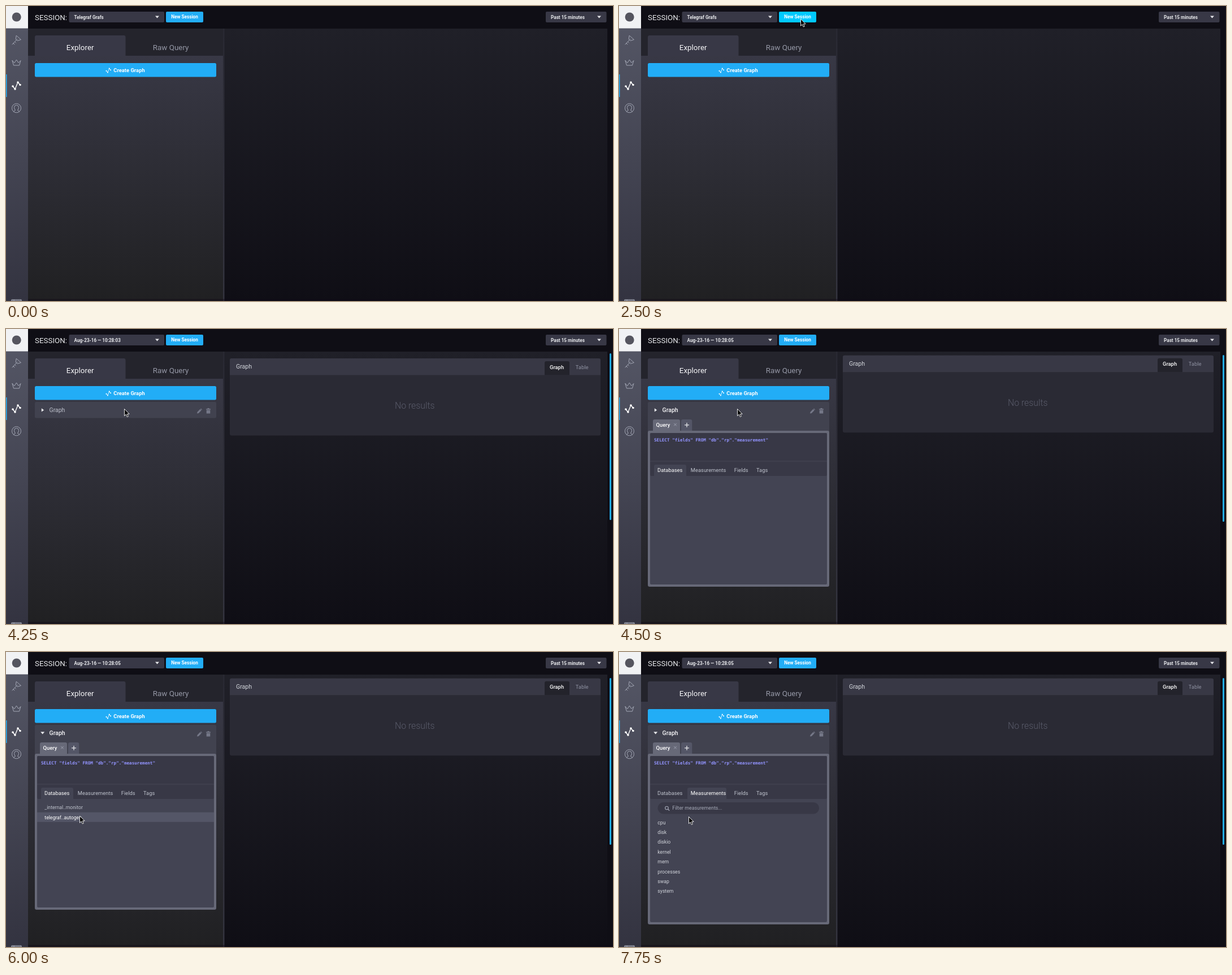
An HTML page for the animation above (8000 ms loop, 1074 by 522 pixels).

```html
<!DOCTYPE html>
<html lang="en">
<head>
<meta charset="utf-8">
<title>Query explorer</title>
<style>
  html, body { margin: 0; width: 100%; height: 100%; overflow: hidden; background: #0f0e15; }
  svg { display: block; width: 100%; height: 100%; }
  text { font-family: Roboto, sans-serif; white-space: pre; }
  .mono { font-family: "DejaVu Sans Mono", monospace; }
</style>
</head>
<body>
<svg id="stage" viewBox="0 0 1074 522">
  <defs>
    <linearGradient id="page" x2="0" y2="1"><stop stop-color="#202028"/><stop offset="1" stop-color="#0f0e15"/></linearGradient>
    <linearGradient id="side" x2="0" y2="1"><stop stop-color="#565867"/><stop offset="1" stop-color="#333340"/></linearGradient>
    <linearGradient id="left" x2="0" y2="1"><stop stop-color="#383845"/><stop offset="1" stop-color="#202022"/></linearGradient>
    <linearGradient id="edge" x2="0" y2="1"><stop stop-color="#292933"/><stop offset="1" stop-color="#34343f"/></linearGradient>
  </defs>
</svg>
<script>
const LOOP = 8000;
const stage = document.getElementById('stage');

const rect = (x, y, w, h, fill, r = 0, more = '') =>
  `<rect x="${x}" y="${y}" width="${w}" height="${h}" rx="${r}" fill="${fill}" ${more}/>`;
const text = (x, y, size, fill, str, weight = 400, more = '') =>
  `<text x="${x}" y="${y}" font-size="${size}" fill="${fill}" font-weight="${weight}" ${more}>${str}</text>`;
const fillPath = (d, fill) => `<path d="${d}" fill="${fill}"/>`;
const line = (d, color, width = 1) =>
  `<path d="${d}" fill="none" stroke="${color}" stroke-width="${width}" stroke-linejoin="round" stroke-linecap="round"/>`;
const group = (id, body) => `<g id="${id}">${body}</g>`;
const caret = (x, y) => fillPath(`M${x} ${y}h7l-3.5 4z`, '#e7e8eb');
const topTab = (x, y, w, h, fill) =>
  fillPath(`M${x} ${y + h}v${3 - h}q0 -3 3 -3h${w - 6}q3 0 3 3v${h - 3}z`, fill);

function graphIcon(x, y, scale) {
  const points = [[-6.5, 1.5], [-2.5, 6.5], [2.5, -5.5], [6.5, -1]];
  const dots = points.map(([a, b]) => `<circle cx="${a}" cy="${b}" r="1.8" fill="#fff"/>`).join('');
  return `<g transform="translate(${x} ${y}) scale(${scale})">${line('M' + points.join('L'), '#fff', 1.4)}${dots}</g>`;
}

function sidebar() {
  const grey = '#a4a8b6';
  return rect(0, 0, 39, 522, 'url(#side)') +
    rect(0, 0, 39, 39.5, '#f1f2f4') +
    '<circle cx="18.7" cy="19.5" r="8" fill="#55555f"/>' +
    line('M11 68L20 58.5M13 66l2 2M15.5 63.3l1.8 1.8M18.5 52.5L26.5 59.5L20 61.5L17.5 59z', grey) +
    line('M11 96.5L13.5 105H23.5L26 96.5L22 100.5L18.5 95L15 100.5z', grey) +
    rect(0, 121, 1.5, 40, '#22adf6') +
    graphIcon(18.5, 140.5, 1) +
    '<circle cx="18.5" cy="180.7" r="8" fill="none" stroke="#a4a8b6"/>' +
    line('M13.5 187Q14 185 16.5 184.5Q14.5 182 14.5 179.5A4 4 0 0 1 22.5 179.5Q22.5 182 20.5 184.5Q23 185 23.5 187', grey) +
    line('M10 523V519.5H27V523M10 521.5H27M14 519.5V522', grey);
}

function header() {
  return rect(39, 0, 1035, 40, '#0f0e15') +
    text(51, 25, 13.4, '#e7e8eb', 'SESSION:') +
    rect(111.5, 10, 168.5, 19, '#383846', 2) +
    text(120.5, 22.6, 8.15, '#e7e8eb', 'Telegraf Grafs', 700, 'id="session"') +
    caret(264, 17.5) +
    rect(283, 10, 66, 19, '#22adf6', 2, 'id="newButton"') +
    text(292.3, 22.2, 8.2, '#fff', 'New Session', 700) +
    rect(955, 10, 107.5, 19, '#383846', 2) +
    text(964, 22.6, 8.2, '#e7e8eb', 'Past 15 minutes', 700) +
    caret(1046, 17.5);
}

function leftPanel() {
  return rect(39, 40, 346, 48, '#24242c') +
    rect(39, 88, 346, 434, 'url(#left)') +
    rect(384, 40, 2.5, 482, 'url(#edge)') +
    topTab(51, 52, 160.5, 36.5, '#383846') +
    text(106.8, 78, 13.4, '#f6f6f8', 'Explorer') +
    text(259.8, 78, 13.4, '#9598a6', 'Raw Query') +
    rect(51, 101, 321, 24.5, '#22adf6', 2.5) +
    graphIcon(181.3, 113.8, .58) +
    text(190.3, 117, 9.4, '#fff', 'Create Graph', 700);
}

function graphRow() {
  const grey = '#757888';
  return rect(51, 129, 321, 28.5, '#41424f', 2.5, 'id="rowBack"') +
    fillPath('M62.8 140.2l4.4 3.2l-4.4 3.2z', '#e7e8eb') .replace('<path', '<path id="arrow"') +
    text(76.5, 146.8, 10.5, '#bec2cc', 'Graph', 400, 'id="rowName"') +
    fillPath('M338 149.5l.6 -2.8l4.9 -4.9l2.2 2.2l-4.9 4.9zM344.1 141.2l.8 -.7l2.1 2.1l-.7 .8z', grey) +
    fillPath('M354 141.3h2.5v-1.2h3v1.2h2.5v1.4h-8zM354.7 143.4h6.6v6.2h-6.6z', grey);
}

function queryBuilder() {
  return topTab(60, 160, 48, 21, '#676978') +
    text(65.6, 173, 9.4, '#fff', 'Query', 500) +
    line('M97.5 167.2l4 4m0 -4l-4 4', '#a4a8b6', .9) +
    topTab(110, 160, 19.3, 21, '#545667') +
    line('M116.5 169.8h7m-3.5 -3.5v7', '#e7e8eb', 1.3) +
    rect(51, 180, 321, 276, '#676978', 3, 'id="frame"') +
    rect(55, 184, 313, 268, '#434453', 2, 'id="inner"') +
    rect(55, 184, 313, 76, '#383846', 2) +
    rect(55, 233.5, 313, 1, '#464755') +
    text(62, 198.8, 7.63, '#9394ff', 'SELECT "fields" FROM "db"."rp"."measurement"', 700, 'class="mono"') +
    topTab(62, 240, 57, 20.5, '#434453').replace('<path', '<path id="tabDb"') +
    topTab(121, 240, 69, 20.5, '#434453').replace('<path', '<path id="tabMeas"') +
    text(68, 253, 9.4, '#fff', 'Databases', 400, 'id="nameDb"') +
    text(126.8, 253, 9.4, '#fff', 'Measurements', 400, 'id="nameMeas"') +
    text(203.8, 253, 9.4, '#bec2cc', 'Fields') +
    text(243, 253, 9.4, '#bec2cc', 'Tags');
}

function databases() {
  return rect(55, 283.7, 313, 17, '#545667', 0, 'id="rowHover"') +
    text(68.3, 278, 8.7, '#bec2cc', '_internal..monitor') +
    text(68.3, 295.6, 8.7, '#bec2cc', 'telegraf..autogen', 400, 'id="autogen"');
}

function measurements() {
  const names = ['cpu', 'disk', 'diskio', 'kernel', 'mem', 'processes', 'swap', 'system'];
  return rect(68.5, 266, 285.5, 20.5, '#383846', 10) +
    '<circle cx="84.5" cy="276" r="2.8" fill="none" stroke="#a4a8b6" stroke-width="1.1"/>' +
    line('M86.7 278.2l2.2 2.2', '#a4a8b6', 1.3) +
    text(94.3, 279.2, 8.85, '#a4a8b6', 'Filter measurements...') +
    names.map((name, i) => text(68.3, 304.6 + 17.4 * i, 8.7, '#d0d3da', name)).join('');
}

function results() {
  return rect(396, 52, 656, 136.5, '#2a2a34', 3) +
    topTab(396, 52, 656, 29.5, '#383845') +
    topTab(953, 57, 44, 24.5, '#23232b') +
    text(407, 69.8, 10.6, '#d4d7dd', 'Graph') +
    text(962, 70.6, 9.4, '#fff', 'Graph', 500) +
    text(1007.8, 70.6, 9.4, '#8e91a1', 'Table') +
    text(688, 140.8, 15.8, '#5a5c6b', 'No results', 300);
}

stage.innerHTML += rect(385, 40, 679, 482, 'url(#page)') +
  rect(1064, 40, 10, 482, '#0f0e15') +
  leftPanel() + header() + sidebar() +
  rect(39, 518.5, 1035, 3.5, '#0f0814', 0, 'opacity=".45"') +
  group('row', graphRow()) +
  group('builder', queryBuilder() + group('dbList', databases()) + group('measList', measurements())) +
  group('results', results()) +
  rect(1068, 43, 3, 295, '#22adf6', 1.5, 'id="scroll"') +
  group('cursor', '<path d="M0 0V12.2L2.8 9.6L4.8 14L6.8 13.1L4.9 8.8H8.7Z" fill="#000" stroke="#fff" stroke-width=".9" stroke-linejoin="round"/>');

const ui = {};
stage.querySelectorAll('[id]').forEach(el => ui[el.id] = el);
const set = (id, attrs) => { for (const k in attrs) ui[id].setAttribute(k, attrs[k]); };
const show = (id, on) => set(id, { visibility: on ? 'inherit' : 'hidden' });

// time, x, y: the pointer jumps from stop to stop
const stops = [
  [0, -30, -30], [250, 536, -13.5], [500, 371, 35], [750, 370, 31], [1250, 368, 31],
  [1500, 325, 27], [1750, 321.5, 23], [3250, 323, 28], [3500, 261, 82], [3750, 249, 100],
  [4000, 209.5, 139], [4250, 209.5, 141.5], [5500, 200, 154], [5750, 150, 256],
  [6000, 130.5, 290], [6250, 129, 290], [6500, 124.5, 290], [7750, 123.5, 291.5]
];

function render(t) {
  const created = t >= 2750, open = t >= 4500, expanded = t >= 4750;
  const hoverRow = t >= 6000 && t < 7000, meas = t >= 7000;
  const [, x, y] = stops.filter(s => s[0] <= t).pop();
  set('cursor', { transform: `translate(${x} ${y})` });

  set('newButton', { fill: t >= 1750 && t < 3500 ? '#00c9ff' : '#22adf6' });
  ui.session.textContent = open ? 'Aug-23-16 — 10:28:05' : created ? 'Aug-23-16 — 10:28:03' : 'Telegraf Grafs';

  show('row', created);
  show('results', created);
  show('scroll', created);
  show('builder', open);
  set('results', { transform: `translate(0 ${open ? -5.2 : 0})` });
  set('scroll', { y: open ? 46 : 43 });

  set('rowBack', { height: open ? 60 : 28.5 });
  set('rowName', { fill: open ? '#f6f6f8' : '#bec2cc', 'font-weight': open ? 500 : 400 });
  set('arrow', { d: expanded ? 'M61.2 141.2h7l-3.5 4.2z' : 'M62.8 140.2l4.4 3.2l-4.4 3.2z' });

  set('frame', { height: meas ? 302 : 276 });
  set('inner', { height: meas ? 294 : 268 });
  show('tabDb', !meas);
  show('tabMeas', meas);
  set('nameDb', { fill: meas ? '#bec2cc' : '#fff' });
  set('nameMeas', { fill: meas ? '#fff' : '#bec2cc' });
  show('dbList', expanded && !meas);
  show('measList', meas);
  show('rowHover', hoverRow);
  set('autogen', { fill: hoverRow ? '#fff' : '#bec2cc' });
}

const start = performance.now();
function tick() {
  render((performance.now() - start) % LOOP);
  requestAnimationFrame(tick);
}
tick();
</script>
</body>
</html>
```
